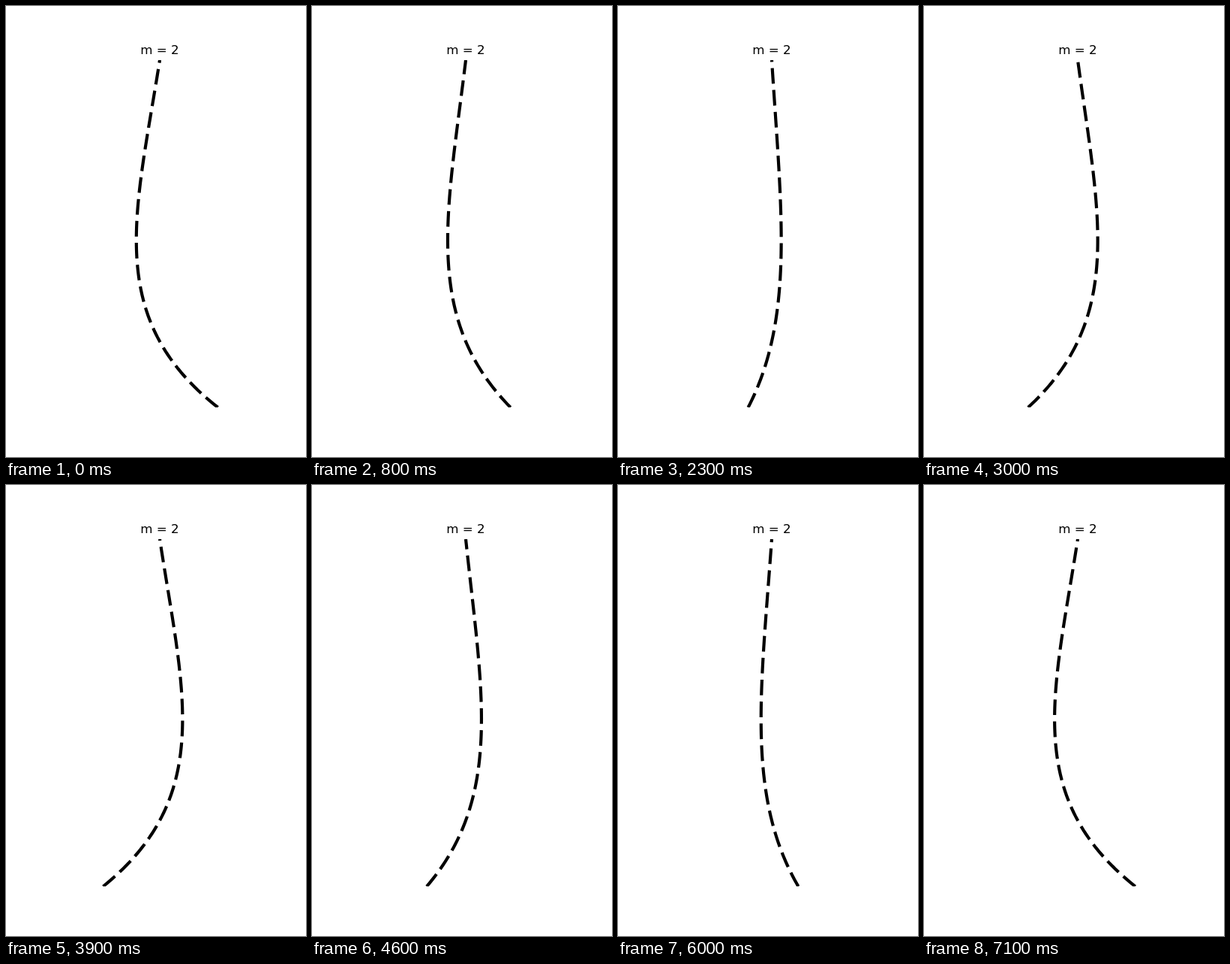
These frames come from a looping animation (400 px wide and 600 px high, 7.2 s). An HTML page:

```html
<!DOCTYPE html>
<html lang="en">
<head>
<meta charset="utf-8">
<title>Hanging chain, second mode</title>
<style>
  html, body { margin: 0; width: 100%; height: 100%; overflow: hidden; background: #fff; }
  svg { display: block; }
</style>
</head>
<body>
<svg width="400" height="600" viewBox="0 0 400 600">
  <clipPath id="axes"><rect x="50" y="72" width="310" height="462"/></clipPath>
  <text x="205" y="64" text-anchor="middle" font-size="16.667" font-family="'DejaVu Sans', sans-serif">m = 2</text>
  <path id="chain" clip-path="url(#axes)" fill="none" stroke="#000"
        stroke-width="4.167" stroke-dasharray="20.833 8.333"/>
</svg>
<script>
const FRAME_MS = 100, FRAMES = 72, POINTS = 100;
const CENTER = 205, BOTTOM = 534, HEIGHT = 462, AMPLITUDE = 77.5;
const ROOT = 5.5200781;                         // second zero of J0
const OMEGA = ROOT / 2 * Math.sqrt(9.81);       // chain of unit length
const DT = 0.01;                                // simulated seconds per frame

// Bessel function J0 by its power series
function besselJ0(x) {
  let term = 1, sum = 1;
  for (let k = 1; k < 25; k++) sum += term *= -x * x / (4 * k * k);
  return sum;
}

const chain = document.getElementById('chain');
const shape = Array.from({ length: POINTS }, (_, i) => {
  const z = i / (POINTS - 1);
  return { y: BOTTOM - HEIGHT * z, offset: AMPLITUDE * besselJ0(ROOT * Math.sqrt(z)) };
});

function draw(now) {
  const frame = Math.floor(now / FRAME_MS) % FRAMES;
  const swing = Math.cos(OMEGA * DT * frame);
  chain.setAttribute('d', 'M' + shape.map(p =>
    `${(CENTER + swing * p.offset).toFixed(3)} ${p.y.toFixed(3)}`).join('L'));
}

const start = performance.now();
function tick() {
  draw(performance.now() - start);
  requestAnimationFrame(tick);
}
tick();
</script>
</body>
</html>
```
